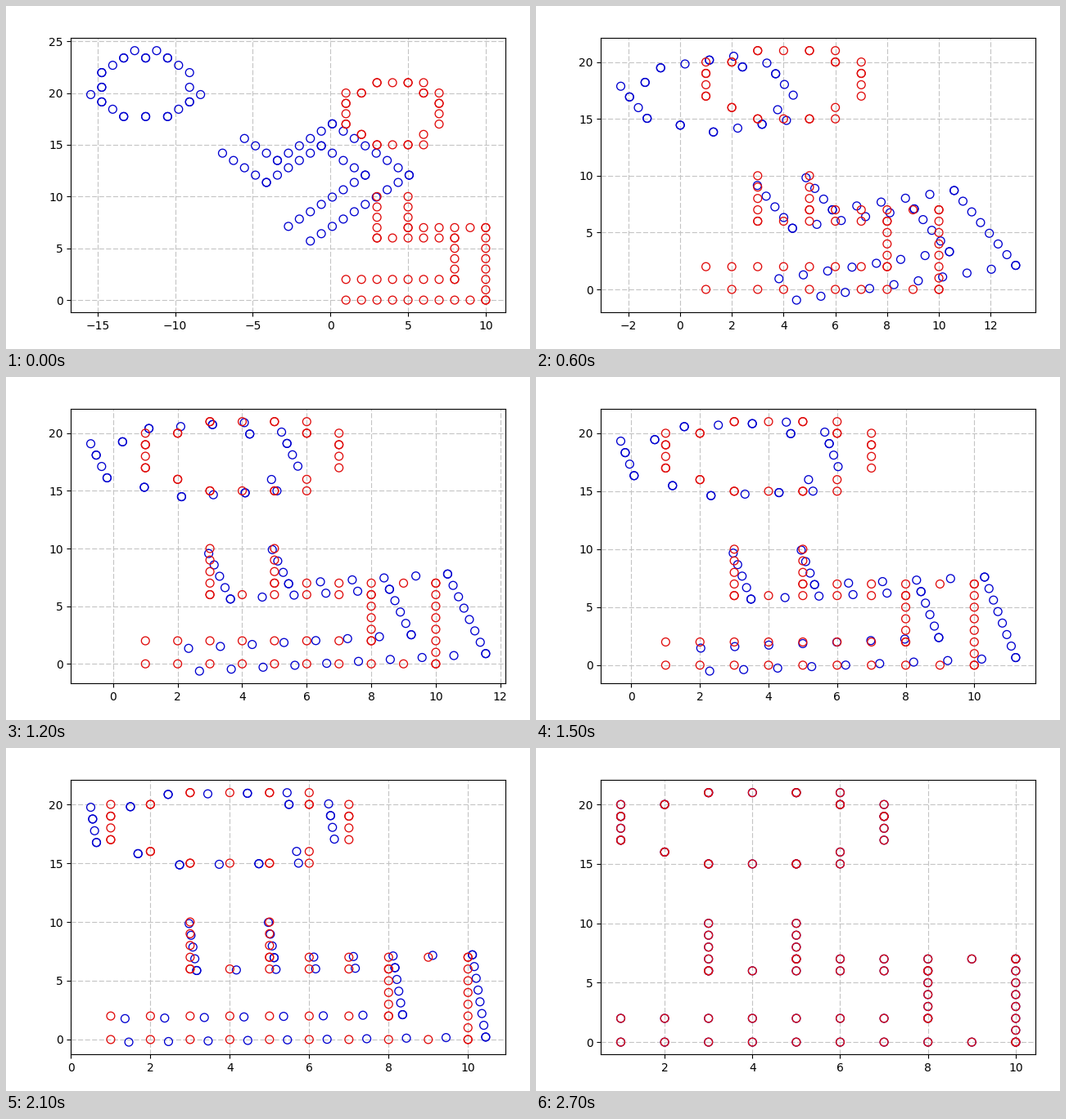
Recreate the animation shown at these times as a matplotlib script. Size 640x420 px, loop 3.3 s.

```python
import numpy as np
import matplotlib.pyplot as plt
from matplotlib.animation import FuncAnimation
from matplotlib.ticker import MultipleLocator

W, H, DPI = 640, 420, 100
LEFT, RIGHT, TOP, BOTTOM = 79.4, 610, 39.4, 375.4
STEP_MS = 300
STEPS = 11

plt.rcParams["font.family"] = "DejaVu Sans"
plt.rcParams["font.size"] = 10


def row(y, x0, x1):
    return [(x, y) for x in range(x0, x1 + 1)]


def column(x, y0, y1):
    return [(x, y) for y in range(y0, y1 + 1)]


# Neighbouring segments share their end points, so corners appear twice.
body = (row(0, 1, 10) + column(10, 0, 7) + row(7, 5, 10) + column(5, 7, 10)
        + row(2, 1, 8) + column(8, 2, 6) + row(6, 3, 8) + column(3, 6, 10))
head = (row(21, 3, 6) + row(20, 1, 2) + column(7, 17, 20) + column(1, 17, 19)
        + row(15, 3, 6) + [(6, 16), (6, 20), (2, 16)])
head_corners = [(3, 21), (5, 21), (6, 20), (2, 20), (7, 19),
                (1, 19), (1, 17), (2, 16), (3, 15), (5, 15)]
fixed = np.array(body + head + head_corners, float)
centre = fixed.mean(axis=0)

# Remaining rotation (degrees) and shift of the centre after each alignment step.
angles = [45, 29.7, 19.85, 14.15, 9.7, 7.45, 4.9, 2.75, 1.0, 0]
drift = [None, (.11, .05), (.08, 0), (.06, -.01), (.045, -.02),
         (.04, -.02), (.02, -.02), (.005, -.02), (0, 0), (0, 0)]


def rotated(points, degrees):
    a = np.radians(degrees)
    c, s = np.cos(a), np.sin(a)
    return points @ np.array([[c, s], [-s, c]])


def moving(step):
    if step == 0:
        return rotated(fixed, angles[0]) + (-2, 5)
    return rotated(fixed - centre, angles[step]) + centre + drift[step]


fig = plt.figure(figsize=(W / DPI, H / DPI), dpi=DPI, facecolor="white")
ax = fig.add_axes([LEFT / W, 1 - BOTTOM / H,
                   (RIGHT - LEFT) / W, (BOTTOM - TOP) / H])
ax.grid(True, linestyle=(0, (5.5, 2.2)), color="#c4c4c4", linewidth=0.8)
ax.set_axisbelow(True)
ax.yaxis.set_major_locator(MultipleLocator(5))


def circles(points, color):
    return ax.scatter(*points.T, s=50, facecolors="none",
                      edgecolors=color, linewidths=0.95)


blue = circles(moving(0), "#0000d0")
red = circles(fixed, "#e00c0c")


def fit(low, high):
    pad = 0.05 * (high - low)
    return low - pad, high + pad


def draw(frame):
    step = min(frame, len(angles) - 1)
    points = moving(step)
    blue.set_offsets(points)
    both = np.vstack([points, fixed])
    low, high = both.min(axis=0), both.max(axis=0)
    ax.set_xlim(fit(low[0], high[0]))
    ax.set_ylim(fit(low[1], high[1]))
    ax.xaxis.set_major_locator(MultipleLocator(5 if step == 0 else 2))
    return blue, red


anim = FuncAnimation(fig, draw, frames=STEPS, interval=STEP_MS,
                     repeat=True, repeat_delay=0, blit=False)
plt.show()
```
